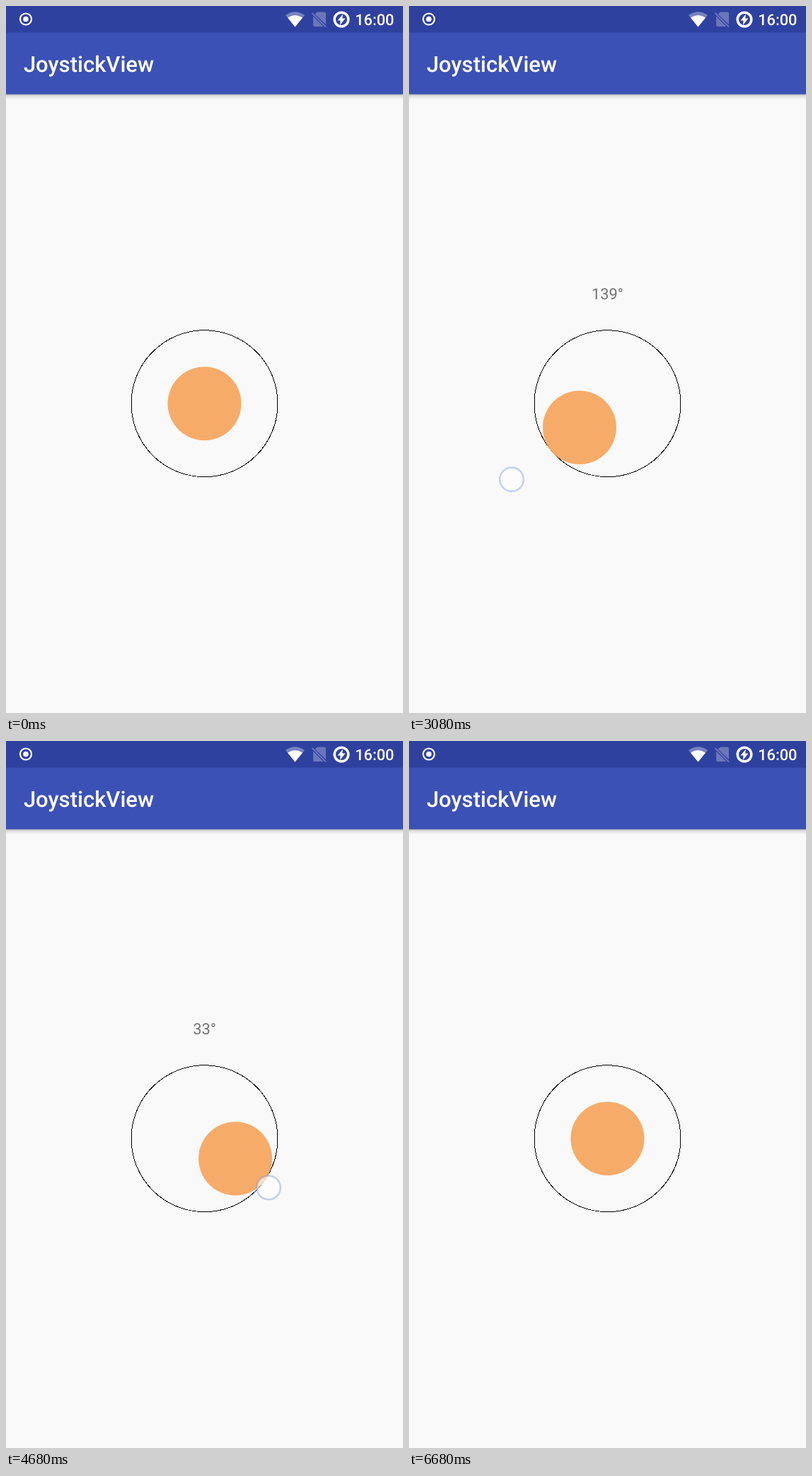
Write an HTML page that moves like this. It is 561x998 px and loops after 6720 ms.

```html
<!DOCTYPE html>
<html lang="en">
<head>
<meta charset="utf-8">
<title>JoystickView</title>
<style>
  html, body { margin: 0; width: 100%; height: 100%; overflow: hidden; background: #f9f9f9; }
  svg { display: block; width: 561px; height: 998px; }
  text { font-family: Roboto, sans-serif; text-rendering: geometricPrecision; }
</style>
</head>
<body>
<svg viewBox="0 0 561 998">
  <defs>
    <linearGradient id="shade" x1="0" y1="0" x2="0" y2="1">
      <stop offset="0" stop-color="#000" stop-opacity=".3"/>
      <stop offset=".4" stop-color="#000" stop-opacity=".1"/>
      <stop offset="1" stop-color="#000" stop-opacity="0"/>
    </linearGradient>
  </defs>
  <rect width="561" height="998" fill="#f9f9f9"/>

  <!-- App bar and status bar -->
  <rect y="124" width="561" height="8" fill="url(#shade)"/>
  <rect width="561" height="124.6" fill="#3c51b5"/>
  <rect width="561" height="37.5" fill="#2f419f"/>
  <text x="24.9" y="93" font-size="31" font-weight="500" fill="#fff">JoystickView</text>
  <text x="548.5" y="27" font-size="21.8" font-weight="500" fill="#fff" text-anchor="end">16:00</text>

  <circle cx="28" cy="18.5" r="8" fill="none" stroke="#fff" stroke-width="2.2"/>
  <circle cx="28" cy="18.5" r="3.8" fill="#fff"/>

  <path d="M408.5 29.5 L395 13 Q408.5 3.5 422 13 Z" fill="#fff" opacity=".35"/>
  <path d="M408.5 29.5 L398 16.5 Q408.5 9.5 419 16.5 Z" fill="#fff"/>

  <g opacity=".28">
    <path d="M440 8.5 H450 Q452 8.5 452 10.5 V26 L436.5 11.5 Z" fill="#fff"/>
    <path d="M434 14.5 L448.5 29 H436 Q434 29 434 27 Z" fill="#fff"/>
    <path d="M432.5 10 L452 29.5" stroke="#fff" stroke-width="1.8"/>
  </g>

  <circle cx="474" cy="19" r="9.8" fill="none" stroke="#fff" stroke-width="3.5"/>
  <path d="M476 11.5 L468.5 20.5 H472.5 L472 27 L479.5 17.5 H475.3 Z" fill="#fff"/>

  <!-- Joystick -->
  <text id="label" x="280.5" y="414" font-size="21.8" fill="#737373" text-anchor="middle"></text>
  <circle cx="280.5" cy="561.2" r="103.5" fill="none" stroke="#000" stroke-width="1" shape-rendering="crispEdges"/>
  <circle id="knob" r="52" fill="#f7ab69"/>
  <g id="touch">
    <circle r="17" fill="#fff" fill-opacity=".6"/>
    <circle r="16.8" fill="none" stroke="#5a78cd" stroke-opacity=".33" stroke-width="2.5"/>
  </g>
</svg>
<script>
const LOOP = 6720, STEP = 40, DOWN = 1640, UP = 6680;
const CX = 280.5, CY = 561.2, REACH = 52;
const LEAD = 20; // ms by which the finger runs ahead of the knob

// Turning points of the drag: time, angle (degrees clockwise), finger distance
const drag = [
  [1640, -35, 30],
  [2400, 21, 157],
  [2720, 76, 227],
  [2960, 125, 180],
  [3640, 196, 156],
  [3800, 221, 139],
  [4320, 271, 133],
  [4680, 393, 114],
  [5060, 437, 115],
  [5440, 353, 190],
  [5680, 315, 181],
  [6040, 362, 198],
  [6300, 437, 218],
  [6680, 470, 95]
];

const $ = id => document.getElementById(id);
const label = $('label'), knob = $('knob'), touch = $('touch');

function slope(i, col) {
  const a = drag[Math.max(i - 1, 0)];
  const b = drag[Math.min(i + 1, drag.length - 1)];
  return (b[col] - a[col]) / (b[0] - a[0]);
}

// Smooth cubic through the turning points
function sample(t, col) {
  let i = 0;
  while (i < drag.length - 2 && t >= drag[i + 1][0]) i++;
  const a = drag[i], b = drag[i + 1], span = b[0] - a[0];
  const u = Math.min((t - a[0]) / span, 1), v = 1 - u;
  return a[col] * (1 + 2 * u) * v * v + b[col] * u * u * (3 - 2 * u)
    + span * u * v * (slope(i, col) * v - slope(i + 1, col) * u);
}

function place(el, angle, distance) {
  const rad = angle * Math.PI / 180;
  const x = CX + distance * Math.cos(rad), y = CY + distance * Math.sin(rad);
  el.setAttribute('transform', `translate(${x} ${y})`);
}

function draw(time) {
  const t = Math.floor((time % LOOP) / STEP) * STEP;
  const touching = t >= DOWN && t < UP;
  const moving = touching && t > DOWN;
  const angle = sample(Math.max(t, DOWN), 1);
  const distance = sample(Math.max(t, DOWN), 2);

  touch.style.display = touching ? '' : 'none';
  place(touch, sample(Math.max(t, DOWN) + LEAD, 1), distance);
  place(knob, angle, moving ? Math.min(REACH, distance) : 0);
  label.textContent = moving ? (Math.round(angle) + 360) % 360 + '°' : '';
}

const start = performance.now();
function tick() {
  draw(performance.now() - start);
  requestAnimationFrame(tick);
}
tick();
</script>
</body>
</html>
```
